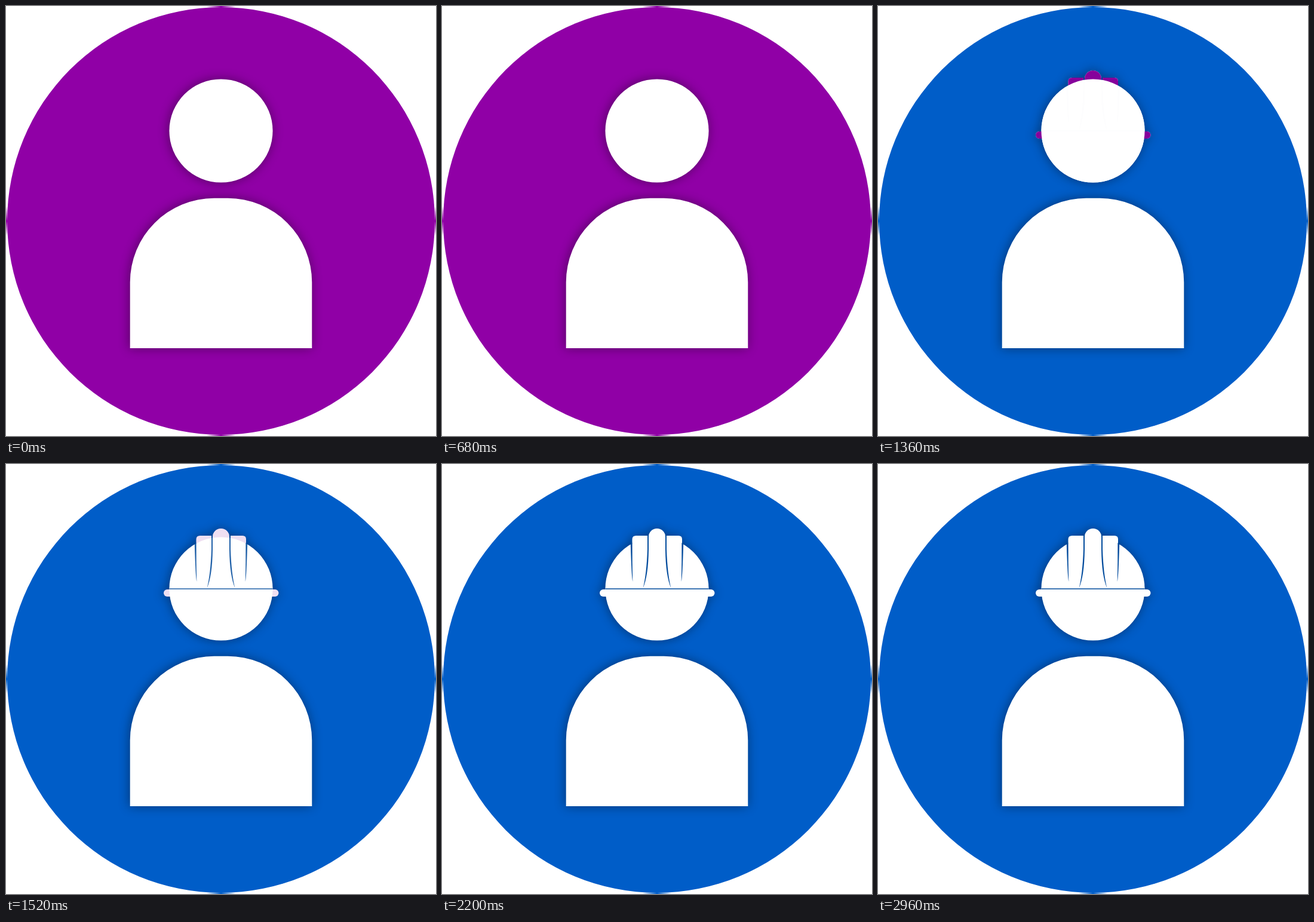
An HTML page that plays this animation: 720x720 px, repeating every 3000 ms.

```html
<!DOCTYPE html>
<html lang="en">
<head>
<meta charset="utf-8">
<title>Worker badge</title>
<style>
  html, body { margin: 0; width: 100%; height: 100%; overflow: hidden; background: #fff; }
  svg { display: block; width: 100%; height: 100%; color: #9000a6; }
  .figure { fill: #fff; filter: drop-shadow(-1px 0 9px rgba(0, 0, 0, .42)); }
</style>
</head>
<body>
<svg viewBox="0 0 720 720">
  <defs>
    <linearGradient id="edge">
      <stop offset="0" stop-color="currentColor" stop-opacity="0"/>
      <stop offset=".5" stop-color="currentColor"/>
      <stop offset="1" stop-color="currentColor" stop-opacity="0"/>
    </linearGradient>
    <rect id="tip" x="335" width="50" height="2" fill="url(#edge)"/>
    <circle id="head" cx="360" cy="209" r="86.6"/>
    <g id="ridges">
      <path d="M318.5 150V126Q318.5 120 325 120H344V150Z"/>
      <path d="M346 150V122A14 14 0 0 1 374 122V150Z"/>
      <path d="M376 150V120H396Q402 120 402 126V150Z"/>
      <rect x="264" y="210" width="192.5" height="12" rx="6"/>
    </g>
    <g id="seams">
      <path d="M315.8 134L318.6 132Q318.4 165 319.3 197Q317.4 190 315.8 134Z"/>
      <path d="M344 120H346V143Q345.5 187 336.5 208Q342.5 185 344 143Z"/>
    </g>
  </defs>

  <circle cx="360" cy="360" r="358" fill="currentColor"/>
  <use href="#tip"/>
  <use href="#tip" transform="rotate(90 360 360)"/>
  <use href="#tip" transform="rotate(180 360 360)"/>
  <use href="#tip" transform="rotate(270 360 360)"/>

  <g class="figure">
    <path d="M207.7 573V463A141 141 0 0 1 348.7 321.8H371.3A141 141 0 0 1 512.3 463V573Z"/>
    <use href="#head"/>
    <use href="#ridges" class="helmet"/>
  </g>
  <g class="helmet" fill="#004a9c">
    <use href="#seams"/>
    <use href="#seams" transform="matrix(-1 0 0 1 720 0)"/>
    <rect x="273.5" y="208.3" width="173" height="1.5"/>
  </g>
  <g id="plain">
    <use href="#ridges" fill="#86009b"/>
    <use href="#head" fill="#fff"/>
  </g>
</svg>
<script>
  const LOOP = 3000, SWITCH = 1360, FADE = 320;
  const svg = document.querySelector("svg");
  const plain = document.getElementById("plain");
  const helmet = document.querySelectorAll(".helmet");

  function draw() {
    const t = performance.now() % LOOP;
    const on = t >= SWITCH;
    const left = Math.max(0, 1 - (t - SWITCH) / FADE);
    svg.style.color = on ? "#005dc8" : "#9000a6";
    for (const part of helmet) part.style.display = on ? "" : "none";
    plain.style.display = on ? "" : "none";
    plain.style.opacity = on ? left ** 3 : 0;
    requestAnimationFrame(draw);
  }
  draw();
</script>
</body>
</html>
```
